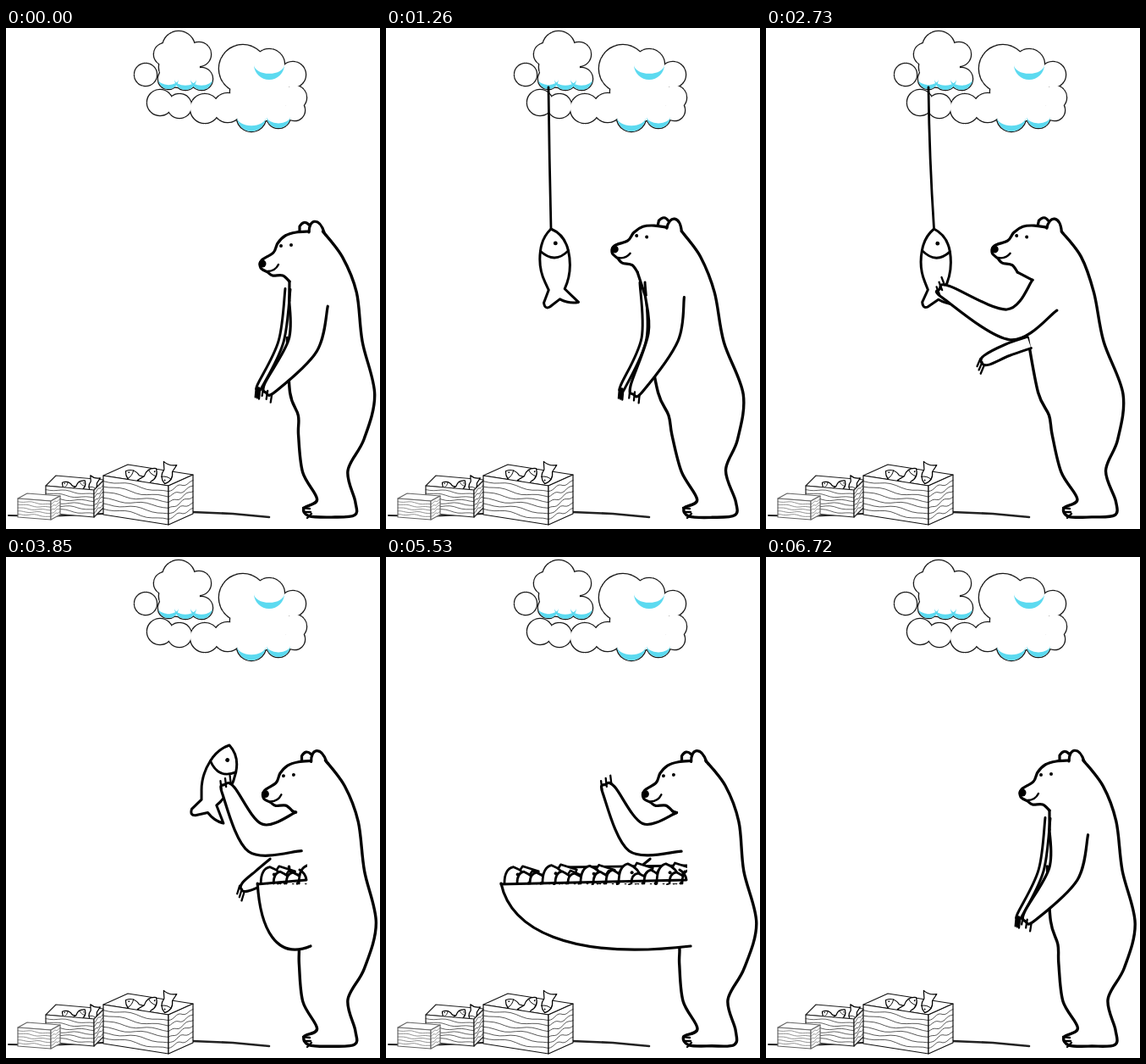
These frames come from a looping animation (442 px wide and 591 px high, 6790 ms). An HTML page:

```html
<!DOCTYPE html>
<html lang="en">
<head>
<meta charset="utf-8">
<title>Bear and fish</title>
<style>
html, body { margin: 0; width: 100%; height: 100%; overflow: hidden; background: #fff; }
svg { display: block; width: 442px; height: 591px; }
</style>
</head>
<body>
<svg viewBox="0 0 442 591" fill="none" stroke="#000" stroke-linecap="round" stroke-linejoin="round">
  <defs>
    <clipPath id="below"><rect y="68" width="442" height="523"/></clipPath>
    <clipPath id="heapArea"><rect y="340" width="356" height="47"/></clipPath>
  </defs>
  <g id="scenery"></g>
  <g id="actors"></g>
</svg>
<script>
const LOOP = 6790, STEP = 70;
const byId = id => document.getElementById(id);
const clamp = v => Math.max(0, Math.min(1, v));
const progress = (t, a, b) => clamp((t - a) / (b - a));
const smooth = u => u * u * (3 - 2 * u);
const mix = (a, b, u) => Array.isArray(a) ? a.map((v, i) => mix(v, b[i], u)) : a + (b - a) * u;
const noise = n => { const s = Math.sin(n * 12.9898) * 43758.5453; return s - Math.floor(s); };
const points = text => text.split(' ').map(p => p.split(',').map(Number));
const draw = (d, width = 3.2, fill = 'none', extra = '') =>
  `<path d="${d}" stroke-width="${width}" fill="${fill}" ${extra}/>`;
const dot = (x, y, rx, ry = rx) =>
  `<ellipse cx="${x}" cy="${y}" rx="${rx}" ry="${ry}" fill="#000" stroke="none"/>`;

// Smooth curve through points
function curve(pts) {
  let d = 'M' + pts[0].map(v => v.toFixed(1));
  for (let i = 0; i < pts.length - 1; i++) {
    const p = pts[i], q = pts[i + 1], before = pts[i - 1] || p, after = pts[i + 2] || q;
    const c = [0, 1].map(k => p[k] + (q[k] - before[k]) / 6);
    const e = [0, 1].map(k => q[k] - (after[k] - p[k]) / 6);
    d += `C${[...c, ...e, ...q].map(v => v.toFixed(1))}`;
  }
  return d;
}

// Hand-drawn line shimmer
const shimmer = (pts, seed) => pts.map((p, i) =>
  p.map((v, k) => v + (noise(seed + i * 7 + k * 3) - 0.5) * 0.9));

// ---- Bear: upright shape, leaning rule, jointed arms ----
const bodyShape = points('375,240 398,270 414,312 421,370 436,432 423,485 404,522 413,558 412,575 385,577 358,576 352,566 368,556 351,524 346,480 345,457 336,430 332,365');
const headShape = points('358,240 343,241 330,245 321,254 316,265 302,274 301,283 309,288 315,292 327,292 335,299');
const headArt = draw(curve(headShape)) + dot(303, 278, 4.5) + dot(325, 257, 2) + dot(337, 256, 2) +
  draw('M347,239V234Q352,226 358,232M358,241C358,225 370,223 376,241') +
  draw('M309,287Q318,287 322,279', 2.4);

// Arms are shoulder, elbow, hand
const poses = {
  stand: { lean: 0, arm: points('358,325 351,374 312,424'), far: points('333,308 325,370 300,422'), farWidth: 3 },
  lean: { lean: 1, arm: points('329,317 328,365 296,425'), far: points('303,300 305,366 280,423'), farWidth: 3 },
  reach: { lean: 1, arm: points('329,315 286,350 213,311'), far: points('311,371 285,380 260,392'), farWidth: 7 },
  hold: { lean: -0.1, arm: points('346,324 295,331 263,275'), far: points('318,363 300,378 283,389'), farWidth: 9 },
  lower: { lean: -0.1, arm: points('356,325 320,360 247,323'), far: points('340,378 320,390 298,402'), farWidth: 7 }
};
const track = [[0, 'stand'], [700, 'stand'], [1230, 'lean'], [1750, 'lean'], [2600, 'reach'],
  [2870, 'reach'], [3500, 'hold'], [6160, 'hold'], [6330, 'lower'], [6650, 'stand'], [LOOP, 'stand']];

function poseAt(t) {
  const i = track.findIndex((key, n) => n && t <= key[0]);
  const [t0, from] = track[i - 1], [t1, to] = track[i];
  const a = poses[from], b = poses[to], u = smooth(progress(t, t0, t1));
  return Object.fromEntries(Object.keys(a).map(part => [part, mix(a[part], b[part], u)]));
}

const along = ([x, y], [dx, dy], length) => [x + dx * length, y + dy * length];
const unit = ([x, y]) => [x / Math.hypot(x, y), y / Math.hypot(x, y)];
const direction = (a, b) => unit([b[0] - a[0], b[1] - a[1]]);
const normal = ([x, y]) => [y, -x];

// Outline runs from the inner shoulder round the hand to the outer shoulder
function limb(joints, widths, width) {
  const [s, e, h] = joints;
  const upper = direction(s, e), fore = direction(e, h);
  const bend = unit([upper[0] + fore[0], upper[1] + fore[1]]);
  const normals = [upper, bend, fore].map(normal);
  const side = sign => joints.map((p, i) => along(p, normals[i], sign * widths[i]));
  const outline = [...side(-1), along(h, fore, widths[2]), ...side(1).reverse()];
  const clawDir = unit([fore[0] * 0.2, fore[1]]);
  const claws = [-0.8, 0, 0.8].map(k => {
    const base = along(along(h, normals[2], k * widths[2]), fore, 5);
    return `M${base}L${along(base, clawDir, 10)}`;
  }).join('');
  return { start: outline[0], art: draw(curve(outline), width, '#fff') + draw(claws, 2.3) };
}

function bearBack(pose, tick) {
  const body = bodyShape.map(([x, y]) => [x - 26 * pose.lean * clamp((540 - y) / 200), y]);
  const w = pose.farWidth;
  return draw(curve(shimmer(body, tick)), 3.4) + draw('M351,566l8,1M352,571l8,0M356,578l5,-5', 2.4) +
    limb(pose.far, [w, w, Math.min(w, 6)], 3).art;
}

function bearFront(pose, tick) {
  const { lean } = pose, arm = limb(shimmer(pose.arm, tick), [23, 18, 8], 3.2);
  const angle = 12 * lean * Math.PI / 180;
  const [cx, cy] = headShape.at(-1), dx = cx - 357, dy = cy - 240;
  const chin = [357 - 26 * lean + dx * Math.cos(angle) - dy * Math.sin(angle),
    240 - 5 * lean + dx * Math.sin(angle) + dy * Math.cos(angle)];
  return arm.art + draw(`M${chin}L${arm.start}`) +
    `<g transform="translate(${-26 * lean} ${-5 * lean}) rotate(${12 * lean} 357 240)">${headArt}</g>`;
}

// ---- Fish ----
const fishArt = draw('M0,0Q-11,10 -13,26Q-16,46 -8,63L-4,72L-10,87Q-9,95 -3,92L9,83Q20,89 31,87L15,71Q25,50 20,26Q16,7 0,0Z', 3, '#fff') +
  draw('M-13,26Q4,42 20,26', 2.8) + dot(5, 17, 2.4);

function hangingFish(t) {
  const drop = progress(t, 0, 700), pull = smooth(progress(t, 2870, 3500));
  const nudge = 3 * progress(t, 1900, 2600);
  const sway = Math.sin(t / 260) * progress(t, 600, 800) * (1 - progress(t, 2600, 2870));
  const fall = 210 * (Math.max(0, t - 4790) / 200) ** 2;
  const x = mix(196 + sway + nudge, 264, pull), y = mix(mix(-30, 237, drop), 222, pull) + fall;
  const recoil = progress(t, 3430, 3640);
  let out = '';
  if (y > 71 && recoil < 1) {
    const ex = mix(x, 192, recoil), ey = mix(y, 71, recoil);
    out += draw(`M192,70Q193,${mix(70, ey, 0.5)} ${ex},${ey}`, 2.8);
  }
  if (t > 0 && t < 5060)
    out += `<g transform="translate(${x} ${y}) rotate(${mix(sway + nudge, 24, pull)})">${fishArt}</g>`;
  return `<g clip-path="url(#below)">${out}</g>`;
}

// ---- Belly pouch ----
function pouchFront(t) {
  const out = progress(t, 3840, 4235) - progress(t, 5440, 6180);
  const open = Math.min(progress(t, 3620, 3840), 1 - progress(t, 6180, 6240));
  return open > 0 ? mix(319, 302, open) - 189 * out : null;
}

// Overlapping fish: pointed backs behind, rounded heads in front
function heap(x0) {
  let back = draw(`M${x0 + 70},366L356,364`, 2.8), front = '';
  for (let i = 0; i < 17; i++) {
    const x = x0 + 4 + i * 15, big = i % 3 === 0;
    const h = (big ? 19 : 11) + 5 * noise(i + 2), w = big ? 27 : 20;
    back += draw(`M${x + 8},385l${w * 0.5},${-h - 1}l${w * 0.7},6l-5,14`, 2.6, '#fff');
    front += draw(`M${x},385q0,${-h * 0.9} ${w * 0.4},${-h}q${w * 0.5},5 ${w * 0.6},${h - 5}l-7,5`, 2.8, '#fff');
    if (big) front += dot(x + w * 0.58, 385 - h * 0.55, 2);
  }
  return `<g clip-path="url(#heapArea)">${back}${front}</g>`;
}

function pouch(t) {
  const x = pouchFront(t);
  if (x === null) return '';
  const w = 360 - x;
  const bag = `M${x},385C${x + 0.05 * w},438 ${x + 0.35 * w},476 360,459`;
  return draw(bag + 'V382Z', 0, '#fff', 'stroke="none"') + heap(x) + draw(bag) +
    draw(`M${x},386L355,381Q354,373 347,369`, 3);
}

// ---- Scenery ----
// Union of round lobes: inked rims first, then white fills, then shaded undersides
function cloud(lobes, shaded) {
  const circle = ([x, y, r], style) => `<circle cx="${x}" cy="${y}" r="${r}" ${style}/>`;
  const crescent = ([x, y, r]) =>
    `M${x - r},${y}A${r},${r} 0 0 0 ${x + r},${y}A${r},${r * 0.6} 0 0 1 ${x - r},${y}`;
  const rims = lobes.map((lobe, i) => {
    const dashes = [0, 1, 2, 3, 4, 5].map(k => (k % 2 ? 2 : 9 + 14 * noise(i * 6 + k)).toFixed(1));
    return circle(lobe, `stroke="#1a1a1a" stroke-width="2.6" stroke-dasharray="${dashes.join(' ')}"`);
  });
  const fills = lobes.map(lobe => circle(lobe, 'fill="#fff" stroke="none"'));
  return rims.join('') + fills.join('') +
    draw(lobes.slice(0, shaded).map(crescent).join(''), 0, '#5cdaf0', 'stroke="none"');
}

const clouds = () =>
  cloud(points('311,43,18 290,105,17 322,104,14 280,48,28 339,55,15 341,82,14 341,97,12 262,94,17 235,95,17 205,92,14 182,88,15 300,75,35'), 3) +
  cloud(points('192,60,12 212,60,13 231,60,13 204,23,19 188,31,13 228,31,14 165,55,13 205,46,24'), 3);

// Wavy grain across a parallelogram with a vertical side h
function face(x, y, dx, dy, h, rows, ink) {
  let grain = '';
  for (let r = 1; r <= rows; r++)
    for (let i = 0; i <= 12; i++) {
      const u = i / 12, v = r / (rows + 1) + 0.05 * Math.sin(Math.PI * u) * Math.sin(u * 9 + r * 1.3);
      grain += `${i ? 'L' : 'M'}${(x + u * dx).toFixed(1)},${(y + u * dy + v * h).toFixed(1)}`;
    }
  return draw(`M${x},${y}l${dx},${dy}v${h}l${-dx},${-dy}Z`, 1.2, '#fff', `stroke="${ink}"`) +
    draw(grain, 0.7, 'none', `stroke="${ink}"`);
}

const crateFish = (x, y, size, angle) =>
  `<g transform="translate(${x} ${y}) rotate(${angle}) scale(${size})">` +
  `${draw('M-11,0Q-5,-9 5,-5L14,-8Q10,0 14,8L5,5Q-5,9 -11,0Z', 1.2 / size, '#fff')}` +
  `${draw('M-4,-6Q-1,0 -4,6')}${dot(-7, -1, 0.9)}</g>`.replace('stroke-width="3.2"', 'stroke-width="0.9"');

function crate(x, y, [fx, fy], [sx, sy], h, rows, ink, fishSize) {
  let out = draw(`M${x},${y}l${sx},${sy}l${fx},${fy}l${-sx},${-sy}Z`, 1.2, '#fff', `stroke="${ink}"`);
  if (fishSize)
    for (let i = 0; i < 3; i++)
      out += crateFish(x + fx * (0.46 + 0.26 * i), y + 1 - i * fishSize, fishSize, [35, 130, -75][i]);
  return out + face(x, y, fx, fy, h, rows, ink) + face(x + fx, y + fy, sx, sy, h, rows, ink);
}

const ground = draw('M3,575L48,576L115,573', 2, 'none', 'stroke="#222"') +
  draw('M220,571L268,573L311,577', 2.6, 'none', 'stroke="#222"');

const crates = () =>
  crate(47, 540, [57, 5], [12, -12], 32, 6, '#222', 0.75) +
  crate(115, 528, [77, 12], [29, -13], 46, 6, '#111', 1) +
  crate(14, 555, [39, 3], [11, -6], 22, 5, '#666', 0);

function render(now) {
  const frame = Math.floor((now % LOOP) / STEP), t = frame * STEP;
  const pose = poseAt(t), tick = Math.floor(frame / 2) * 13;
  byId('actors').innerHTML = bearBack(pose, tick) + hangingFish(t) + pouch(t) + bearFront(pose, tick);
}

byId('scenery').innerHTML = clouds() + ground + crates();
const start = performance.now();
function loop() {
  render(performance.now() - start);
  requestAnimationFrame(loop);
}
loop();
</script>
</body>
</html>
```
